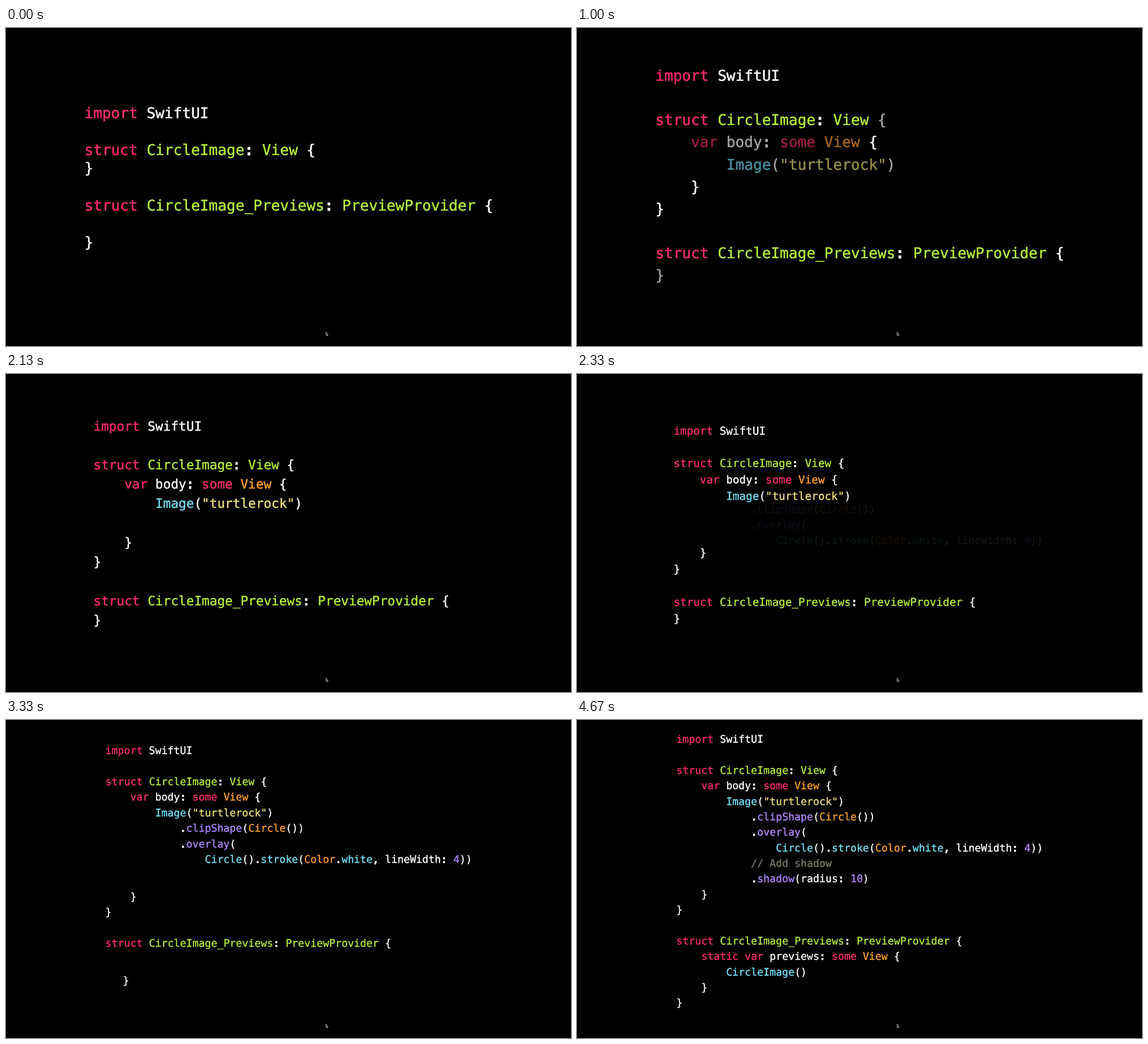
Write an HTML page that moves like this. It is 998x561 px and loops after 4710 ms.

```html
<!DOCTYPE html>
<html lang="en">
<head>
<meta charset="utf-8">
<title>Code walkthrough</title>
<style>
  html, body { margin: 0; width: 100%; height: 100%; overflow: hidden; background: #000; }
  svg { display: block; width: 998px; height: 561px; }
  text {
    font: 100px "DejaVu Sans Mono", monospace;
    font-variant-ligatures: none;
    text-rendering: geometricPrecision;
    white-space: pre;
  }
  tspan { fill: currentColor; stroke: currentColor; stroke-width: 2px; }
  .w, .d { color: #fff; }
  .d { stroke-width: 6px; }
  .p { color: #fb2c6f; }
  .g { color: #b4ec3b; }
  .o { color: #fd9f2e; }
  .c { color: #6fe0f7; }
  .v { color: #b088fc; }
  .y { color: #ebe078; }
  .n { color: #7a776a; }
</style>
</head>
<body>
<svg viewBox="0 0 998 561">
  <g id="code"></g>
  <path d="M565.3 536.2v6l1.2-.9.9 1.9 1-.5-.8-1.8h1.5z" fill="#222" stroke="#ddd" stroke-width=".7"/>
</svg>
<script>
const LOOP = 4710, FPS = 24, ADVANCE = 0.602;

// Layout of each slide: left edge, first baseline, line height, font size
const slides = [
  { x: 138.5, y: 158.6, line: 32.6, size: 26.08 },
  { x: 138.5, y: 93, line: 39.13, size: 26.08 },
  { x: 175.6, y: 108.6, line: 27.36, size: 18.23 },
  { x: 175.6, y: 40.2, line: 27.36, size: 18.23 }
];

// Moves between slides: start, ramp-up time, speed per ms, cut, fade-in of new code
const moves = [
  { start: 360, ramp: 100, speed: 0.00195, cut: 910, fade: [855, 1083] },
  { start: 1850, ramp: 140, speed: 0.0021, cut: 2370, fade: [2305, 2670] },
  { start: 2912, ramp: 100, speed: 0.0019, cut: 3450, fade: [3400, 3710] }
];

// Code pieces: coloured runs (d = heavy dots), first slide,
// then line and column per slide (last value repeats)
const pieces = [
  ["w:}", 0, [3, 5, 8, 10], [0, 4]],
  ["w:}", 0, [7, 6, 9, 11], [0]],
  ["p:import|w: SwiftUI", 0, [0], [0]],
  ["p:struct|g: CircleImage|d::|g: View", 0, [2], [0]],
  ["w:{", 0, [2, 3], [25, 24]],
  ["p:struct|g: CircleImage_Previews|d::|g: PreviewProvider|w: {", 0, [5, 8, 11, 13], [0]],
  ["w:{", 1, [2], [25]],
  ["p:var|w: body|d:: |p:some|o: View", 1, [3], [4]],
  ["c:Image|w:(|y:\"turtlerock\"|w:)", 1, [4], [8]],
  ["w:}", 1, [9, 9, 12, 16], [0, 0, 0, 4]],
  ["d:.|v:clipShape|w:(|o:Circle|w:())", 2, [5], [12]],
  ["d:.|v:overlay|w:(", 2, [6], [12]],
  ["c:Circle|w:()|d:.|c:stroke|w:(|o:Color|d:.|c:white|d:, |w:lineWidth|d:: |v:4|w:))", 2, [7], [16]],
  ["n:// Add shadow", 3, [8], [12]],
  ["d:.|v:shadow|w:(radius|d:: |v:10|w:)", 3, [9], [12]],
  ["p:static var|w: previews|d:: |p:some|o: View|w: {", 3, [14], [4]],
  ["c:CircleImage|w:()", 3, [15], [8]],
  ["w:}", 3, [17], [0]]
].map(([runs, first, lines, cols]) => ({ node: makeText(runs), first, lines, cols }));

function makeText(runs) {
  const make = tag => document.createElementNS("http://www.w3.org/2000/svg", tag);
  const text = make("text");
  for (const run of runs.split("|")) {
    const span = make("tspan");
    span.setAttribute("class", run[0]);
    span.textContent = run.slice(2);
    text.append(span);
  }
  document.getElementById("code").append(text);
  return text;
}

const clamp = v => Math.min(1, Math.max(0, v));
const mix = (a, b, p) => a + (b - a) * p;
const at = (list, i) => list[Math.min(i, list.length - 1)];

// Accelerates, then runs evenly until it is cut to the end pose
function progress(t, { start, ramp, speed, cut }) {
  const s = t - start;
  if (s <= 0) return 0;
  if (t >= cut) return 1;
  return Math.min(1, s < ramp ? speed * s * s / (2 * ramp) : speed * (s - ramp / 2));
}

function pose({ lines, cols }, i) {
  const { x, y, line, size } = slides[i];
  return [x + at(cols, i) * size * ADVANCE, y + at(lines, i) * line, size];
}

function draw(ms) {
  const t = Math.floor((ms + 4) * FPS / 1000) * 1000 / FPS;
  const steps = moves.map(m => progress(t, m));
  const from = Math.min(2, steps.filter(p => p === 1).length);

  for (const piece of pieces) {
    const { first, node } = piece;
    // New code waits in its own slide's place
    const a = pose(piece, Math.max(first, from));
    const b = pose(piece, Math.max(first, from + 1));
    const [x, y, size] = a.map((v, i) => mix(v, b[i], steps[from]));
    node.setAttribute("transform", `translate(${x} ${y}) scale(${size / 100})`);

    let alpha = 1;
    if (first) {
      const [begin, end] = moves[first - 1].fade;
      alpha = clamp((t - begin) / (end - begin));
    }
    node.setAttribute("opacity", alpha);
  }
}

const begun = performance.now();
function tick() {
  draw((performance.now() - begun) % LOOP);
  requestAnimationFrame(tick);
}
tick();
</script>
</body>
</html>
```
